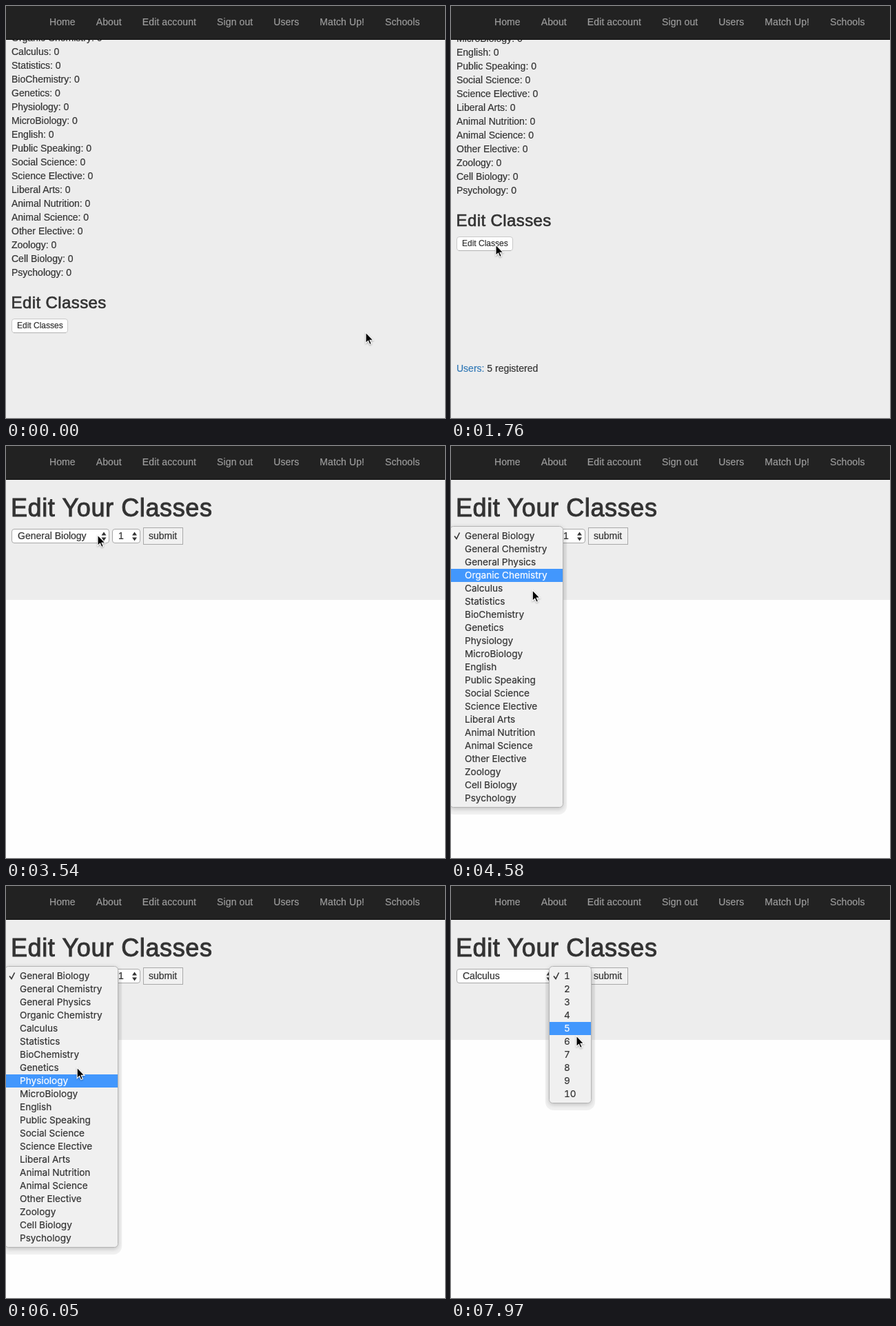
These frames come from a looping animation (637x597 px, 8000 ms). An HTML page:

```html
<!DOCTYPE html>
<html lang="en">
<head>
<meta charset="utf-8">
<title>Edit classes</title>
<style>
  html, body { margin: 0; width: 100%; height: 100%; overflow: hidden; background: #ededed; }
  svg { display: block; color: #333; }
  text { font: 14px "Liberation Sans", Arial, sans-serif; white-space: pre;
    fill: currentColor; stroke: currentColor; stroke-width: .2px; }
  .nav { color: #9d9d9d; }
  .nav text { letter-spacing: .1px; }
  .title { letter-spacing: .017em; stroke-width: .027em; }
  .h1 { font-size: 36px; }
  .h3 { font-size: 24px; }
  .small { font-size: 12px; }
  .link { fill: #337ab7; stroke: #337ab7; }
  .field { fill: #fff; stroke: #a8a8a8; }
  .halo { fill: rgba(0, 0, 0, .05); }
  .panel { fill: #f0f0f0; stroke: #b4b4b4; filter: drop-shadow(0 2px 3px rgba(0, 0, 0, .2)); }
  .menu text { font: 13.6px Inter, sans-serif; font-variant-numeric: tabular-nums; }
  .bar { fill: #4297fd; }
  .tick { fill: none; stroke: currentColor; stroke-width: 1.6; }
  .on { color: #fff; }
  .pressed rect { fill: url(#blue); stroke: #2d7ff0; }
  .pressed text { color: #fff; }
</style>
</head>
<body>
<svg width="637" height="597" viewBox="0 0 637 597">
  <defs>
    <linearGradient id="blue" x2="0" y2="1">
      <stop stop-color="#6bb2fa"/><stop offset="1" stop-color="#1470fb"/>
    </linearGradient>
    <path id="arrows" d="M-3.5 -1.5 L0 -6.5 L3.5 -1.5Z M-3.5 1.5 L0 6.5 L3.5 1.5Z" fill="#333"/>
  </defs>

  <rect width="637" height="597" fill="#ededed"/>

  <g id="profile">
    <g id="counts"></g>
    <text class="title h3" x="7.5" y="438">Edit Classes</text>
    <g id="button">
      <rect x="8.5" y="453.5" width="81" height="20" rx="3.5" fill="#fff" stroke="#c9c9c9"/>
      <path d="M11 473.5 H87" stroke="#b2b2b2"/>
      <text class="small" x="16" y="467">Edit Classes</text>
    </g>
    <text x="8" y="649"><tspan class="link">Users:</tspan> 5 registered</text>
  </g>

  <g id="editor">
    <rect y="223" width="637" height="374" fill="#fefefe"/>
    <text class="title h1" x="7" y="102">Edit Your Classes</text>
    <rect class="field" x="8.5" y="120.5" width="141" height="20" rx="3.5"/>
    <text id="subject" x="17" y="135"></text>
    <use href="#arrows" x="142" y="131"/>
    <rect class="field" x="154.5" y="120.5" width="40" height="20" rx="3.5"/>
    <text x="163" y="135">1</text>
    <use href="#arrows" x="186.5" y="131"/>
    <rect x="199.5" y="118.5" width="57" height="24" fill="#f1f1f1" stroke="#a9a9a9"/>
    <text x="207" y="135">submit</text>
  </g>

  <g class="nav">
    <rect width="637" height="48" fill="#222"/>
    <rect y="48" width="637" height="1" fill="#080808"/>
    <text id="links" x="63" y="28"></text>
  </g>

  <g id="menus"></g>

  <path id="cursor" d="M0 0 V15.5 L3.5 12.2 L5.8 17.4 L8.3 16.3 L6 11.2 H10.8Z" stroke="#fff"
        stroke-width="1.1" style="filter: drop-shadow(0 1px 1px rgba(0, 0, 0, .3))"/>
</svg>

<script>
const LOOP = 8000, TICK = 147.6, ROW = 19, TOP = 121;
const $ = id => document.getElementById(id);

function add(parent, tag, attrs, text = "") {
  const el = document.createElementNS("http://www.w3.org/2000/svg", tag);
  for (const key in attrs) el.setAttribute(key, attrs[key]);
  el.textContent = text;
  return parent.appendChild(el);
}

const show = (el, on) => { el.style.display = on ? "" : "none"; };

const subjects = ["General Biology", "General Chemistry", "General Physics", "Organic Chemistry",
  "Calculus", "Statistics", "BioChemistry", "Genetics", "Physiology", "MicroBiology", "English",
  "Public Speaking", "Social Science", "Science Elective", "Liberal Arts", "Animal Nutrition",
  "Animal Science", "Other Elective", "Zoology", "Cell Biology", "Psychology"];
subjects.forEach((name, i) => add($("counts"), "text", { x: 8, y: i * 20 - 9 }, name + ": 0"));

["Home", "About", "Edit account", "Sign out", "Users", "Match Up!", "Schools"]
  .forEach((label, i) => add($("links"), "tspan", { dx: i && 30 }, label));

function makeMenu(x, width, items) {
  const g = add($("menus"), "g", { class: "menu" });
  const height = items.length * ROW + 8;
  add(g, "rect", { class: "halo", x: x - 6, y: TOP, width: width + 12, height: height + 6, rx: 12 });
  add(g, "rect", { class: "panel", x: x - .5, y: TOP - 4.5, width: width + 1, height, rx: 5 });
  const bar = add(g, "rect", { class: "bar", x, width, height: ROW });
  const tick = add(g, "path", { class: "tick", d: `M${x + 6} 130.5 l3 4 l4.5 -9` });
  const labels = items.map((s, i) => add(g, "text", { x: x + 21, y: TOP + 14 + i * ROW }, s));
  return (open, y) => {
    show(g, open);
    const row = Math.max(0, Math.min(items.length - 1, Math.floor((y - TOP) / ROW)));
    bar.setAttribute("y", TOP + row * ROW);
    labels.forEach((el, i) => el.classList.toggle("on", i === row));
    tick.classList.toggle("on", row === 0);
  };
}

const subjectMenu = makeMenu(-1, 163, subjects);
const countMenu = makeMenu(143, 60, Array.from({ length: 10 }, (_, i) => i + 1));

const smooth = u => u * u * (3 - 2 * u);
const brake = u => 1 - (1 - u) ** 3;

// Pointer moves, times in ticks
const start = { x: 522, y: 473 };
const moves = [
  { from: .2, to: 8, x: 65, y: 346, ease: brake },   // to the button
  { from: 16, to: 18, x: 259, y: 277, ease: brake }, // away after the click
  { from: 20, to: 24, x: 133, y: 129 },              // to the subject field
  { from: 27, to: 37, x: 91, y: 356 },               // down the list
  { from: 37, to: 44, x: 111, y: 203 },              // back up to Calculus
  { from: 46, to: 49.5, x: 172, y: 132 },            // to the count field
  { from: 50, to: 56, x: 185.5, y: 247 }             // down the numbers
];

function pointer(k) {
  let { x, y } = start;
  for (const m of moves) {
    const u = Math.max(0, Math.min(1, (k - m.from) / (m.to - m.from)));
    const e = (m.ease || smooth)(u);
    x += (m.x - x) * e;
    y += (m.y - y) * e;
  }
  return { x, y };
}

function draw() {
  // The screen refreshes once per tick
  const k = Math.floor((performance.now() % LOOP + 10) / TICK);
  const { x, y } = pointer(k);
  const hoverY = pointer(k - .4).y; // the highlight trails the pointer
  const editing = k >= 19, chosen = k >= 46;

  $("cursor").setAttribute("transform", `translate(${x} ${y})`);
  show($("profile"), !editing);
  show($("editor"), editing);
  $("profile").setAttribute("transform", `translate(0 ${k < 1 ? 0 : -119})`);
  $("button").classList.toggle("pressed", k === 13 || k === 14);
  $("subject").textContent = chosen ? "Calculus" : subjects[0];
  subjectMenu(k >= 26 && !chosen, hoverY);
  countMenu(k >= 50, hoverY);
  requestAnimationFrame(draw);
}
draw();
</script>
</body>
</html>
```
